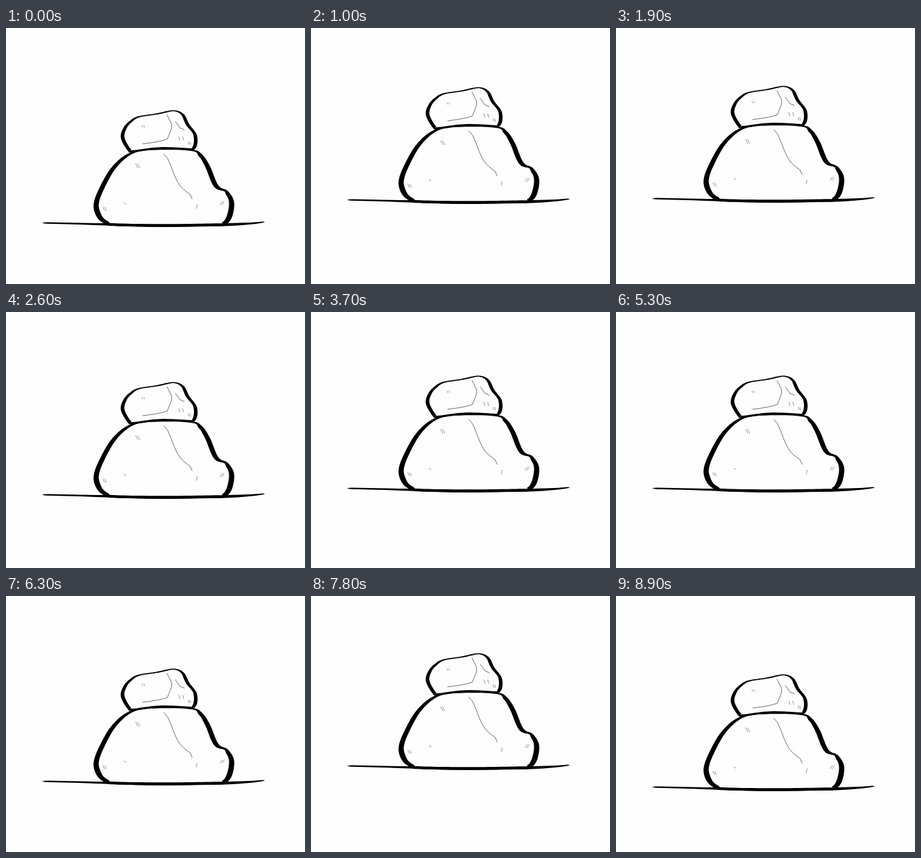
Animation, 466 px wide and 400 px high, one loop 9000 ms. Source, as an HTML page:

```html
<!DOCTYPE html>
<html lang="en">
<head>
<meta charset="utf-8">
<title>Floating stones</title>
<style>
  html, body { margin: 0; width: 100%; height: 100%; overflow: hidden; background: #fefefe; }
  svg { display: block; }
  .ink { fill: #000; }
  .paper { fill: #fefefe; }
  .cracks, .ticks { fill: none; stroke: #444; stroke-width: .8; stroke-linecap: round; stroke-linejoin: round; }
  .ticks { stroke: #777; }
</style>
</head>
<body>
<svg width="466" height="400" viewBox="0 0 466 400">
  <g id="scene">
    <path class="ink" d="M56 304.8 Q60 303 66 303.5 L140 305 H345 Q385 304.3 399 302.5 Q403 302.5 403 303.8
      Q372 310 300 310.3 Q245 311.6 190 310 Q150 308 62 305.8 Z"/>
    <g id="stones"></g>
    <path class="cracks" d="M251 136 L258 150 V157 L251.5 173.5 Q240 178 213 181 M264 146 L271 156 L278 159
      M246 197 L252 204 L258 218 Q264 236 271 246 L277 252.5 L287 260 L290 267"/>
    <path class="ticks" id="ticks"/>
  </g>
</svg>
<script>
// Key points of each outline, and the pen widths added on flat tops, sides and undersides
const stones = [
  { thin: 1.9, side: 6.2, under: 2.3, outline: [
    [195, 194], [166, 216], [146, 249], [136.5, 276], [142, 296], [156, 307], [172, 309.5], [245, 310.5], [325, 309.5],
    [341, 308], [352, 296], [355.5, 272], [346, 255], [331, 246], [318, 216], [306, 198], [290, 190], [236, 188.5]] },
  { thin: 1.6, side: 4, under: 1.2, outline: [
    [206, 138], [193, 145], [183, 156], [179, 172], [190, 192], [198, 194], [240, 189], [283, 190.5], [292, 191],
    [298, 182], [297, 166], [286, 151], [277, 134.5], [261, 128.5], [234, 133.5]] }
];

// Samples a closed Catmull-Rom curve
function sampleCurve(points, steps = 10) {
  const n = points.length;
  return points.flatMap((b, i) => {
    const a = points[(i + n - 1) % n], c = points[(i + 1) % n], d = points[(i + 2) % n];
    return Array.from({ length: steps }, (_, s) => {
      const t = s / steps;
      return b.map((v, k) => v + t / 2 * (c[k] - a[k]
        + t * (2 * a[k] - 5 * v + 4 * c[k] - d[k] + t * (3 * v - a[k] - 3 * c[k] + d[k]))));
    });
  });
}

// Moves the outline inwards by a pen width that depends on its direction
function innerEdge(curve, { thin, side, under }) {
  const n = curve.length;
  return curve.map(([x, y], i) => {
    const [x0, y0] = curve[(i + n - 2) % n], [x1, y1] = curve[(i + 2) % n];
    const length = Math.hypot(x1 - x0, y1 - y0);
    const nx = (y0 - y1) / length, ny = (x1 - x0) / length;
    const width = thin + side * Math.abs(nx) ** 1.5 + under * Math.max(0, ny);
    return [x - nx * width, y - ny * width];
  });
}

const shape = (name, points) =>
  `<path class="${name}" d="M${points.map(p => p.map(v => v.toFixed(2))).join('L')}Z"/>`;

document.getElementById('stones').innerHTML = stones.map(stone => {
  const curve = sampleCurve(stone.outline);
  return shape('ink', curve) + shape('paper', innerEdge(curve, stone));
}).join('');

const tick = (x, y, dx, dy) => `M${x} ${y}l${dx} ${dy}`;
const pair = (x, y, dx, dy, gap = 3) => tick(x, y, dx, dy) + tick(x + gap, y, dx, dy);
document.getElementById('ticks').setAttribute('d',
  pair(202, 212, 3.5, 6.5) + pair(151, 280, 2.5, 5) + pair(337, 271, -3, 5) + pair(269.5, 170, 1.5, 5.5, 6)
  + pair(212, 152.5, 1, 2.5) + pair(284, 178, 1, 4, 2.5) + tick(298, 276, -1.5, 6) + tick(184, 273, 3, 2));

const scene = document.getElementById('scene');
const HOP = 3000, HEIGHT = 40, STEP = 100;

function draw() {
  const t = Math.floor(performance.now() / STEP) * STEP % HOP;
  const u = t / HOP;
  const lift = Math.ceil(HEIGHT * 4 * u * (1 - u));
  scene.setAttribute('transform', `translate(0 ${-lift})`);
  requestAnimationFrame(draw);
}
draw();
</script>
</body>
</html>
```
